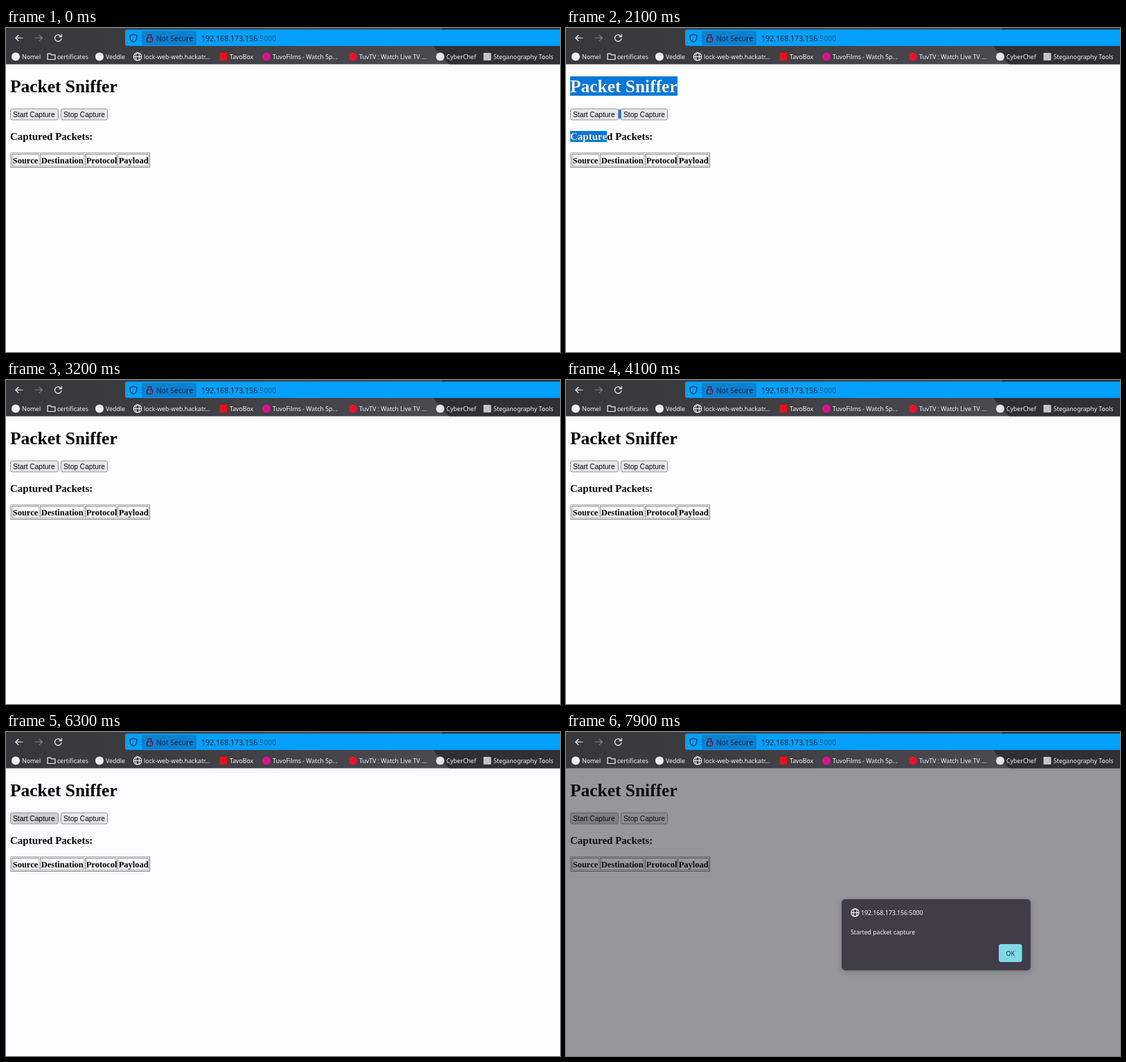
Animation, 800 px wide and 469 px high, one loop 8000 ms. Source, as an HTML page:

```html
<!DOCTYPE html>
<html lang="en">
<head>
<meta charset="utf-8">
<title>Packet Sniffer</title>
<style>
  html, body { margin: 0; width: 100%; height: 100%; overflow: hidden; background: #fefefe; }
  svg { display: block; width: 100%; height: 100%; }
  text { white-space: pre; }
  .serif { font-family: "Liberation Serif", serif; font-weight: bold; }
  .ui { font-family: "Noto Sans", sans-serif; font-size: 8.75px; fill: #f7f7f9; }
  .address { font-size: 10.6px; fill: #081d33; }
  .button { font: 10.2px "Liberation Sans", sans-serif; }
  .line { fill: none; stroke: #f4f4f6; stroke-width: 1.2; stroke-linecap: round; stroke-linejoin: round; }
  .ink { stroke: #0a2540; }
</style>
</head>
<body>
<svg viewBox="0 0 800 469" preserveAspectRatio="none">
  <defs>
    <linearGradient id="theme">
      <stop offset="0" stop-color="#38373c"/>
      <stop offset=".25" stop-color="#3d3c41"/>
      <stop offset=".79" stop-color="#4b4a50"/>
    </linearGradient>
    <filter id="shadow" x="-20%" y="-30%" width="140%" height="170%">
      <feDropShadow dx="0" dy="2" stdDeviation="5" flood-opacity=".2"/>
    </filter>
    <clipPath id="selectedArea">
      <rect x="6" y="70" width="155" height="28"/>
      <rect x="6" y="149" width="53" height="16"/>
    </clipPath>
    <g id="globe" class="line">
      <circle r="5.6"/>
      <ellipse rx="2.5" ry="5.6"/>
      <path d="M-5.6 0H5.6"/>
    </g>
    <g id="headings" class="serif">
      <text x="6" y="92.8" font-size="25.45">Packet Sniffer</text>
      <text x="6" y="162" font-size="15">Captured Packets:</text>
    </g>
  </defs>

  <rect id="page" width="800" height="469"/>
  <path id="selection" fill="#0078d7" d="M6 70h155v28H6zM75 118h5v13h-5zM6 149h53v16H6z"/>
  <use href="#headings"/>
  <use id="selectedText" href="#headings" fill="#fff" clip-path="url(#selectedArea)"/>

  <g stroke="#8f8f9d">
    <rect id="start" x="6.5" y="117" width="69" height="16" rx="2.5"/>
    <rect x="79.5" y="117" width="67" height="16" rx="2.5" fill="#e9e9ed"/>
  </g>
  <text class="button" x="10" y="129">Start Capture</text>
  <text class="button" x="83" y="129">Stop Capture</text>
  <g id="table" class="serif" font-size="12.5"></g>

  <rect id="dim" y="52" width="800" height="417" fill="#1c1b22" fill-opacity=".45"/>

  <g id="chrome">
    <rect width="800" height="52.5" fill="url(#theme)"/>
    <path fill="#302f34" d="M630 0H800V52.5H640L618 28z"/>

    <path class="line" d="M24 14.5H14M18 10.3L13.8 14.5L18 18.7"/>
    <path class="line" stroke-opacity=".4" d="M42 14.5H52M48 10.3L52.2 14.5L48 18.7"/>
    <path class="line" d="M79.3 12A4.8 4.8 0 1 0 80 15.5M80.3 9.5V12.7H77"/>

    <rect x="172" y="2.3" width="640" height="23.7" rx="3" fill="#04a0fb"/>
    <rect x="196" y="4" width="79" height="21" rx="2" fill="#0b80cf"/>
    <g class="line ink">
      <path d="M184 9.2L189 11V14.5Q188.5 18 184 20.3Q179.5 18 179 14.5V11z"/>
      <rect x="203.5" y="14" width="8" height="6" rx="1"/>
      <path d="M205 14V12a2.5 2.5 0 0 1 5 0V14"/>
      <path stroke="#d3264f" d="M202.5 10L212.5 20.5"/>
    </g>
    <text class="ui address" style="font-size:10.3px" x="217" y="18.7">Not Secure</text>
    <text class="ui address" x="282" y="18.7">192.168.173.156<tspan fill="#0b5c97">:5000</tspan></text>

    <path class="line" d="M60 45.5V37.2H64L65.5 38.8H71V45.5z"/>
    <use href="#globe" x="190" y="41.5"/>
    <g id="bookmarks"></g>
  </g>

  <g id="dialog">
    <rect x="398" y="242" width="273" height="103" rx="5" fill="#413e4a" filter="url(#shadow)"/>
    <use href="#globe" x="417.5" y="261.5"/>
    <text class="ui" x="426" y="264.8">192.168.173.156:5000</text>
    <text class="ui" x="411" y="292.5">Started packet capture</text>
    <rect id="ok" x="625" y="307" width="33.5" height="26" rx="3.5"/>
    <text class="ui" x="641.7" y="323.6" text-anchor="middle" style="fill:#2b2a33">OK</text>
  </g>
</svg>
<script>
const LOOP = 8000;
const $ = id => document.getElementById(id);

function add(parent, tag, attributes, text = "") {
  const node = document.createElementNS("http://www.w3.org/2000/svg", tag);
  for (const [name, value] of Object.entries(attributes)) node.setAttribute(name, value);
  node.textContent = text;
  parent.append(node);
}

// Bevelled border: one colour for the top and left, another for the other sides.
function bevel(x, y, w, h, topLeft, bottomRight) {
  const style = { fill: "none", "stroke-width": 1 };
  add($("table"), "path", { ...style, stroke: topLeft, d: `M${x} ${y + h}V${y}H${x + w}` });
  add($("table"), "path", { ...style, stroke: bottomRight, d: `M${x + w} ${y}V${y + h}H${x}` });
}

bevel(6.5, 180.5, 201, 21, "#a9a9a9", "#777");
[["Source", 8, 40], ["Destination", 49, 64], ["Protocol", 114, 46], ["Payload", 161, 45]]
  .forEach(([label, x, width]) => {
    bevel(x + .5, 182.5, width - 1, 17, "#7c7c7c", "#b0b0b0");
    add($("table"), "text", { x: x + 1.7, y: 195.6 }, label);
  });

// Label, text x, icon shape, icon colour
[["Nomel", 23, "circle", "#f2f2f2"],
 ["certificates", 74],
 ["Veddle", 144, "circle", "#f2f2f2"],
 ["lock-web-web.hackatr...", 199],
 ["TavoBox", 323, "square", "#f00c18"],
 ["TuvoFilms - Watch Sp...", 385, "circle", "#d9148c"],
 ["TuvTV : Watch Live TV ...", 510, "circle", "#e5162f"],
 ["CyberChef", 636, "circle", "#e4e4e4"],
 ["Steganography Tools", 704, "square", "#c4c4c6"]]
  .forEach(([label, x, shape, fill]) => {
    const middle = x - 9;
    if (shape === "circle") add($("bookmarks"), "circle", { cx: middle, cy: 41.5, r: 6, fill });
    if (shape === "square") add($("bookmarks"), "rect", { x: middle - 5.5, y: 36, width: 11, height: 11, fill });
    add($("bookmarks"), "text", { class: "ui", x, y: 44.7 }, label);
  });

const show = (id, visible) => $(id).setAttribute("visibility", visible ? "visible" : "hidden");
const paint = (id, colour) => $(id).setAttribute("fill", colour);

function draw(t) {
  const selecting = t >= 2100 && t < 2500;
  const alerting = t >= 6500;
  show("selection", selecting);
  show("selectedText", selecting);
  show("dim", alerting);
  show("dialog", alerting);
  paint("page", t >= 6300 ? "#fcfbfe" : "#fefefe");
  paint("start", t >= 4900 ? "#d0d0d3" : "#e9e9ed");
  paint("ok", t >= 7800 ? "#80d9e8" : "#3ed9fb");
}

const started = performance.now();
function tick() {
  draw((performance.now() - started) % LOOP);
  requestAnimationFrame(tick);
}
tick();
</script>
</body>
</html>
```
